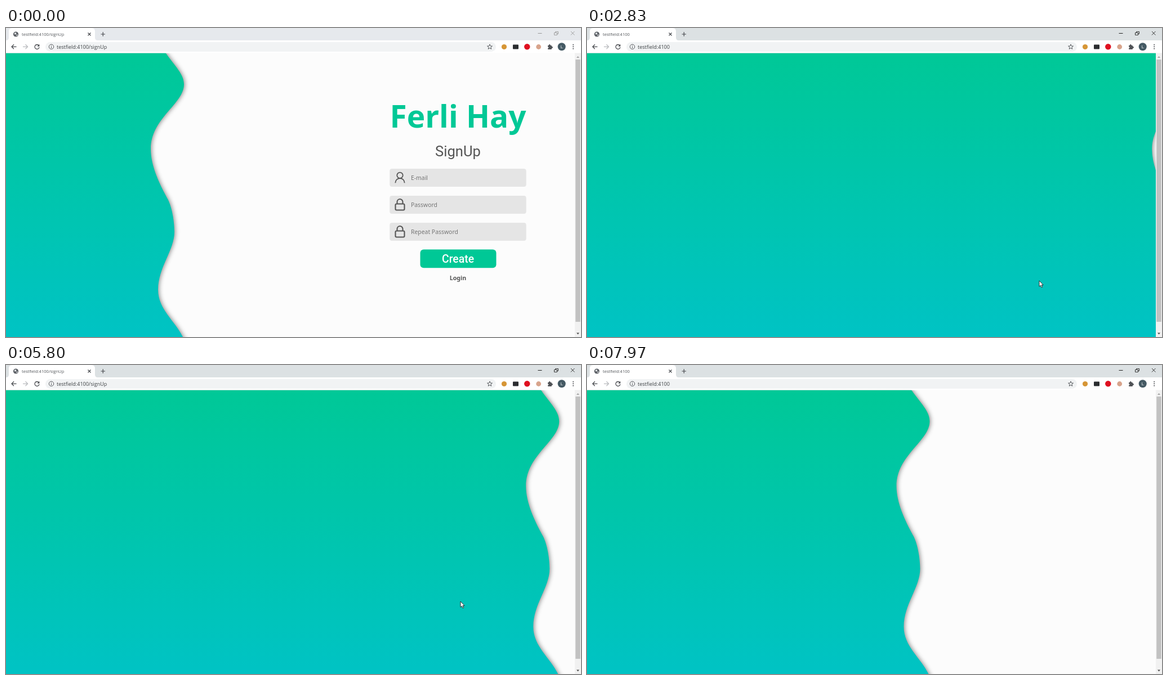
Animation of 1021 by 549 pixels, one loop 8000 ms. Source, as an HTML page with a canvas:

```html
<!DOCTYPE html>
<html lang="en">
<head>
<meta charset="utf-8">
<title>Sign up and login</title>
<style>
  html, body { margin: 0; width: 100%; height: 100%; overflow: hidden; background: #fcfcfc; }
  canvas { display: block; width: 1021px; height: 549px; }
</style>
</head>
<body>
<canvas id="stage" width="1021" height="549"></canvas>
<script>
const ctx = document.getElementById('stage').getContext('2d');
const W = 1021, H = 549, LOOP = 8000;
const TOP = 44.6, RIGHT = 1010, MID = 802.5;
const GREEN = '#00c896', DARK = '#555', PAPER = '#fcfcfc';
const UI = '"Open Sans", "Noto Sans", sans-serif';
const BODY = '"Noto Sans", "Open Sans", sans-serif';
const HEAD = 'Roboto, Arial, sans-serif';

const HOST = 'testfield:4100';
const BRAND = 'Ferli Hay';
const FOCUS_AT = 400;
const SWEEP_TIME = 1000, SWEEP = 930, FADE = 300;

// when the old page leaves and the next one enters
const SWITCHES = [
  { leave: 2139, enter: 3121 },
  { leave: 5170, enter: 6180 },
  { leave: 7582, enter: 8582 }
];

const PAGES = [
  { path: '/signUp', head: 'SignUp', y: 219, grow: 0, button: 'Create', link: 'Login',
    fields: ['E-mail', 'Password', 'Repeat Password'] },
  { path: '', head: 'Login', y: 243, grow: -1.4, button: 'Login', link: 'create new account',
    fields: ['E-mail', 'Password'] }
];

// time, x, y
const CURSOR = [
  [900, 1024, 520], [1700, 803, 449], [4500, 803, 449], [4950, 807, 420],
  [6450, 807, 420], [6900, 811, 437], [7620, 811, 437], [7900, 830, 570]
];

const clamp = v => Math.max(0, Math.min(1, v));

// cubic-bezier(.42, 0, .58, 1)
function ease(x) {
  x = clamp(x);
  let lo = 0, hi = 1;
  for (let i = 0; i < 24; i++) {
    const s = (lo + hi) / 2, r = 1 - s;
    if (1.26 * s * r * r + 1.74 * s * s * r + s * s * s < x) lo = s; else hi = s;
  }
  return lo * lo * (3 - 2 * lo);
}

function rect(x, y, w, h, r, color) {
  ctx.beginPath();
  ctx.roundRect(x, y, w, h, r);
  ctx.fillStyle = color;
  ctx.fill();
}

function disc(x, y, r, color) {
  ctx.beginPath();
  ctx.arc(x, y, r, 0, Math.PI * 2);
  ctx.fillStyle = color;
  ctx.fill();
}

function stroke(d, color, width = 1) {
  ctx.strokeStyle = color;
  ctx.lineWidth = width;
  ctx.stroke(new Path2D(d));
}

function fill(d, color) {
  ctx.fillStyle = color;
  ctx.fill(new Path2D(d));
}

function text(str, x, y, font, color, align = 'left') {
  ctx.font = font;
  ctx.fillStyle = color;
  ctx.textAlign = align;
  ctx.fillText(str, x, y);
}

function at(x, y, draw) {
  ctx.save();
  ctx.translate(x, y);
  draw();
  ctx.restore();
}

function drawTabs(title, focused) {
  rect(0, 0, W, 22, 0, focused ? '#dce1e3' : '#e6e9ed');
  fill('M0 22 Q5 22 5 17 V6 Q5 0 11 0 H152 Q158 0 158 6 V17 Q158 22 163 22Z', '#fff');
  disc(17.5, 11, 4.6, '#5f6368');
  fill('M14.5 9 L17.5 8 L18.5 10 L16 12Z M18 12 L21 11.5 L19.5 14.5Z', '#e8eaed');
  text(title, 28, 13.7, '7.6px ' + UI, '#55585c');
  stroke('M145.5 8.5 l5 5 m0 -5 l-5 5', '#45484c', 1.2);
  stroke('M168.5 11 h7.5 M172.2 7.2 v7.5', '#45484c', 1.2);
  const c = focused ? '#222' : '#999';
  stroke('M944.5 9.5 h7', c);
  stroke('M973.5 8.5 h5 v4 h-5z M975.5 8.5 v-2 h5 v4 h-2', c, .9);
  stroke('M1003 6 l6.5 6.5 m0 -6.5 l-6.5 6.5', c, .9);
}

function drawToolbar(url) {
  rect(0, 22, W, TOP - 22, 0, '#fff');
  rect(70, 25, 800, 17, 8.5, '#f1f3f4');
  stroke('M18.5 33.3 H10 M14 29.3 l-4 4 l4 4', '#4a4d51', 1.3);
  stroke('M30 33.3 h8.5 M34.5 29.3 l4 4 l-4 4', '#b9bbbe', 1.3);
  stroke('M58 30.8 A4 4 0 1 0 59 34.2', '#4a4d51', 1.3);
  fill('M59.4 28.8 v4 h-4z', '#4a4d51');
  stroke('M76.3 33.3 a4.2 4.2 0 1 0 8.4 0 a4.2 4.2 0 1 0 -8.4 0 M80.5 32.8 v3 M80.5 30.8 v1', '#55585c');
  text(url, 90, 36.5, '9px ' + UI, '#3c4043');

  const star = Array.from({ length: 10 }, (_, i) => {
    const r = i % 2 ? 2 : 4.7, a = i * Math.PI / 5 - Math.PI / 2;
    return (859 + r * Math.cos(a)).toFixed(2) + ' ' + (33.6 + r * Math.sin(a)).toFixed(2);
  });
  stroke('M' + star.join('L') + 'Z', '#4a4d51', .9);

  disc(884.5, 33.5, 4.6, '#d69636');
  rect(900, 29.5, 10, 8, 1, '#2b2d30');
  disc(925.3, 33.3, 5.2, '#df1020');
  disc(945.7, 33.5, 4.4, '#d8a48c');
  rect(962, 31, 7, 7, 1, '#505357');
  disc(965.2, 30.6, 1.6, '#505357');
  disc(969.3, 34.3, 1.6, '#505357');
  disc(962.2, 34.8, 1.2, '#fff');
  disc(986.7, 33.3, 7, '#455a64');
  text('L', 986.7, 36, '7.5px ' + HEAD, '#fff', 'center');
  for (const y of [29.8, 33.3, 36.8]) disc(1007.2, y, 1, '#4a4d51');
}

function drawScrollbar() {
  rect(RIGHT, TOP, W - RIGHT, H - TOP, 0, '#f1f1f1');
  rect(1011.3, 56, 8.4, 466, 0, '#c1c1c1');
  fill('M1013 53 h5 l-2.5 -3z', '#a3a3a3');
  fill('M1013 541.5 h5 l-2.5 3z', '#505050');
}

function userIcon() {
  stroke('M-5.2 -4.2 a5.2 5.2 0 1 0 10.4 0 a5.2 5.2 0 1 0 -10.4 0 ' +
         'M-8.2 9.3 C-8 -1.6 8 -1.6 8.2 9.3', DARK, 1.8);
}

function lockIcon() {
  stroke('M-6 -1.5 H6 Q8 -1.5 8 .5 V7.5 Q8 9.5 6 9.5 H-6 Q-8 9.5 -8 7.5 V.5 Q-8 -1.5 -6 -1.5Z ' +
         'M-5 -1.5 V-5 A5 5 0 0 1 5 -5 V-1.5', DARK, 2.1);
}

const linkY = page => page.y + 81 + 48 * page.fields.length;

function drawForm(page, alpha, rise, hoverLink) {
  const g = page.grow;
  ctx.globalAlpha = rise;
  text(BRAND, MID, page.y - 42 - 36 * (1 - rise), 'bold 55px ' + BODY, GREEN, 'center');
  ctx.globalAlpha = 1;
  text(page.head, MID, page.y + 8.8, '25.6px ' + HEAD, DARK, 'center');
  page.fields.forEach((label, i) => {
    const y = page.y + 47 + 48 * i;
    rect(681.3 - g, y - 16 - g, 242.4 + 2 * g, 32 + 2 * g, 4, '#e5e5e5');
    at(699.5 - g, y, i ? lockIcon : userIcon);
    text(label, 719 - g, y + 4, '10.4px ' + BODY, '#757575');
  });
  const by = linkY(page) - 34;
  rect(735.5, by - 16.4, 135, 32.6, 6, GREEN);
  text(page.button, MID, by + 6.8, '500 19.4px ' + HEAD, '#fff', 'center');
  text(page.link, MID, by + 38, 'bold 10.7px ' + BODY, hoverLink ? '#222' : DARK, 'center');

  // a veil of page colour fades the form as one group
  ctx.globalAlpha = 1 - alpha;
  rect(640, 100, 330, 380, 0, PAPER);
  ctx.globalAlpha = 1;
}

function drawWave(dx) {
  const grad = ctx.createLinearGradient(0, TOP, 0, H);
  grad.addColorStop(0, '#00c897');
  grad.addColorStop(1, '#00c3c4');
  ctx.save();
  ctx.translate(dx, 0);
  ctx.shadowColor = 'rgba(0,0,0,.5)';
  ctx.shadowBlur = 8;
  ctx.shadowOffsetX = 1;
  fill('M-1300 25 H270 L284 45 C300 68 316 82 316 100 C316 135 257 160 257 215 ' +
       'C257 245 272 276 286 302 C294 315 299 342 299 362 C299 395 270 425 270 465 ' +
       'C270 500 300 520 314 549 L324 570 H-1300Z', grad);
  ctx.restore();
}

function cursorAt(t) {
  const i = CURSOR.findIndex(k => k[0] > t);
  if (i < 1) return null;
  const [t0, x0, y0] = CURSOR[i - 1], [t1, x1, y1] = CURSOR[i];
  const p = ease((t - t0) / (t1 - t0));
  return { x: x0 + (x1 - x0) * p, y: y0 + (y1 - y0) * p };
}

function drawCursor(pos, hand) {
  const d = hand
    ? 'M-1.2 1 Q0 -.8 1.2 1 V5.3 Q2.7 4.5 3.5 5.8 Q5 5 5.6 6.5 Q7.3 6 7.3 8 V10.5 ' +
      'Q7.2 12.3 6 13.2 V15 H-.6 V13.5 Q-2 12 -4.5 8.8 Q-4.4 7 -2.6 8 L-1.2 9.2Z'
    : 'M0 0 V10.3 L2.4 8.2 L4.1 12 L5.8 11.2 L4.1 7.6 H7.2Z';
  at(pos.x, pos.y, () => {
    fill(d, '#fff');
    stroke(d, '#222', .9);
    if (hand) stroke('M1.2 5.3 V8 M3.5 5.8 V8.2 M5.6 6.5 V8.5', '#222', .7);
  });
}

function render(t) {
  const past = SWITCHES.filter(s => s.leave <= t);
  const n = past.length;
  const last = past[n - 1] || { leave: -LOOP, enter: -LOOP };
  const leaving = t < last.enter;
  const page = PAGES[(leaving ? n + 1 : n) % 2];
  const alpha = leaving ? clamp(1 - (t - last.leave) / FADE) : 1;
  const rise = leaving ? 1 : ease((t - last.enter) / SWEEP_TIME);
  const dx = SWEEP * (leaving ? ease((t - last.leave) / SWEEP_TIME) : 1 - rise);

  const pos = cursorAt(t);
  let onLink = false, onButton = false;
  if (pos && alpha > 0 && dx + 300 < pos.x) {
    const ly = linkY(page), off = Math.abs(pos.x - MID);
    onLink = Math.abs(pos.y - ly) < 9 && off < page.link.length * 3.1;
    onButton = Math.abs(pos.y - ly + 34) < 16 && off < 67;
  }

  rect(0, 0, W, H, 0, PAPER);
  ctx.save();
  ctx.beginPath();
  ctx.rect(0, TOP, RIGHT, H - TOP);
  ctx.clip();
  if (alpha > 0) drawForm(page, alpha, rise, onLink);
  drawWave(dx);
  ctx.restore();

  const url = HOST + PAGES[n % 2].path;
  drawTabs(url, t >= FOCUS_AT);
  drawToolbar(url);
  drawScrollbar();
  if (pos) drawCursor(pos, onLink || onButton);
}

const start = performance.now();
function tick() {
  render((performance.now() - start) % LOOP);
  requestAnimationFrame(tick);
}
tick();
</script>
</body>
</html>
```
